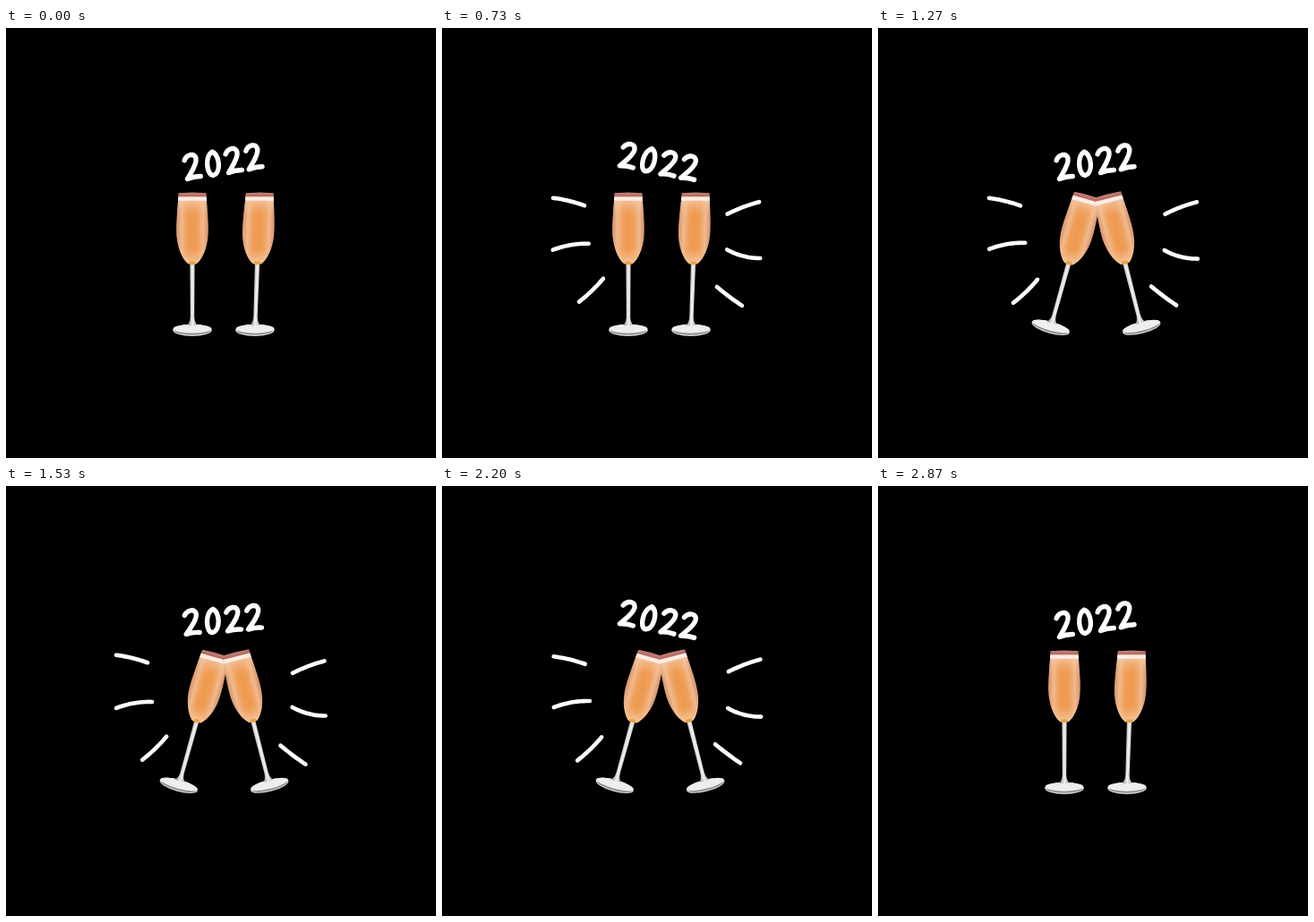
Animation, 480 px wide and 480 px high, one loop 2990 ms. Source, as an HTML page with a canvas:

```html
<!DOCTYPE html>
<html lang="en">
<head>
<meta charset="utf-8">
<title>Cheers 2022</title>
<style>
  html, body { margin: 0; width: 100%; height: 100%; overflow: hidden; background: #000; }
  canvas { display: block; width: 100vmin; height: 100vmin; }
</style>
</head>
<body>
<canvas id="stage" width="480" height="480" aria-label="Two glasses clinking, 2022"></canvas>
<script>
const ctx = document.getElementById('stage').getContext('2d');
const LOOP = 2990, TICK = 200 / 3;

const lerp = (a, b, k) => a + (b - a) * k;
const rad = d => d * Math.PI / 180;
// 0 before a, 1 after b, straight in between
const ramp = (t, a, b) => Math.max(0, Math.min(1, (t - a) / (b - a)));

// Both motions go there and back twice per loop
const tiltAt = t => ramp(t, 70, 330) - ramp(t, 600, 730) + ramp(t, 800, 1000) - ramp(t, 2330, 2530);
const swingAt = t => ramp(t, 70, 530) - ramp(t, 870, 1070) + ramp(t, 1400, 2000) - ramp(t, 2330, 2670);

function shape(fill, build) {
  ctx.beginPath();
  build();
  ctx.fillStyle = fill;
  ctx.fill();
}

const oval = (cx, cy, rx, ry) => () => ctx.ellipse(cx, cy, rx, ry, 0, 0, 7);

function gradient(x0, y0, x1, y1, colors) {
  const g = ctx.createLinearGradient(x0, y0, x1, y1);
  colors.forEach((c, i) => g.addColorStop(i / (colors.length - 1), c));
  return g;
}

function bowl() {
  ctx.moveTo(-15.2, -152);
  ctx.bezierCurveTo(-17, -130, -19, -112, -17, -99);
  ctx.bezierCurveTo(-15, -86, -9, -76, -4.5, -73);
  ctx.lineTo(4.5, -73);
  ctx.bezierCurveTo(9, -76, 15, -86, 17, -99);
  ctx.bezierCurveTo(19, -112, 17, -130, 15.2, -152);
  ctx.closePath();
}

// Glass with its origin at the middle of the foot
function glass(x, y, angle, skew) {
  ctx.save();
  ctx.translate(x, y);
  ctx.rotate(rad(angle));
  ctx.transform(1, 0, skew, 1, 0, 0);

  shape('#d6d3d1', oval(0, 1, 21.8, 6.6));
  shape('#8f8c8a', oval(0, 1.4, 20, 4.8));
  shape('#efeeed', oval(0, -0.5, 21.4, 5));

  shape(gradient(-2.5, 0, 2.5, 0, ['#bdb9b6', '#f6f4f2', '#cfcbc8']), () => {
    ctx.moveTo(-2.6, -74);
    ctx.lineTo(-2.2, -14);
    ctx.quadraticCurveTo(-2.5, -7, -6, -4);
    ctx.lineTo(6, -4);
    ctx.quadraticCurveTo(2.5, -7, 2.2, -14);
    ctx.lineTo(2.6, -74);
  });

  ctx.save();
  ctx.beginPath();
  bowl();
  ctx.clip();
  ctx.fillStyle = gradient(-18, 0, 18, 0,
    ['#d4946c', '#f2b98c', '#ef9f5a', '#ee994e', '#efa05c', '#f2b98c', '#d0906e']);
  ctx.fillRect(-20, -153, 40, 82);
  const clear = 'rgba(244,190,145,0)';
  ctx.fillStyle = gradient(0, -146, 0, -72, ['rgba(246,208,184,.75)', clear, clear, clear, 'rgba(250,215,185,.85)']);
  ctx.fillRect(-20, -148, 40, 78);
  ctx.fillStyle = '#fbece4';
  ctx.fillRect(-20, -148, 40, 4.5);
  ctx.fillStyle = '#b56f69';
  ctx.fillRect(-20, -153, 40, 5);
  ctx.restore();

  shape('#c07a73', oval(0, -151.5, 15.2, 1.3));
  shape('#e9a34f', oval(0, -74, 4, 2));
  ctx.restore();
}

function two(x, y) {
  ctx.moveTo(x - 7.5, y - 8.5);
  ctx.bezierCurveTo(x - 4, y - 15, x + 5, y - 15.5, x + 5.5, y - 9);
  ctx.bezierCurveTo(x + 6, y - 2, x - 3, y + 7, x - 7, y + 12.5);
  ctx.quadraticCurveTo(x + 1, y + 10.5, x + 8, y + 11.5);
}

function year(angle) {
  ctx.save();
  ctx.translate(242.3, 149.3);
  ctx.rotate(rad(angle));
  ctx.lineWidth = 5.4;
  ctx.beginPath();
  two(-35, 1);
  two(11.5, 0.5);
  two(34.5, 0);
  ctx.moveTo(-10.5, -12.5);
  ctx.bezierCurveTo(-20, -9, -20, 13, -13, 13.5);
  ctx.bezierCurveTo(-3, 12, -3, -9, -10.5, -12.5);
  ctx.stroke();
  ctx.restore();
}

// Inner end, outer end, sideways bend; in the order they are drawn
const RAYS = [
  [319.5, 208, 355, 194.5, -1],
  [159, 198, 124, 189.5, 1],
  [306, 289, 334, 310, 0.5],
  [319, 247.5, 356, 257, 2.5],
  [164, 240.5, 124, 247.5, 2],
  [179, 280, 152, 306, -1]
];

function ray([x0, y0, x1, y1, bow], i, t) {
  const grow = ramp(t, 60 + i * 10, 420 + i * 10);
  const wipe = ramp(t, 2330 + i * 35, 2610 + i * 35);
  if (grow <= wipe) return;
  const dx = Math.sin(t / 170 + i * 2), dy = Math.sin(t / 210 + i * 3);
  const len = Math.hypot(x1 - x0, y1 - y0);
  const nx = (y0 - y1) / len, ny = (x1 - x0) / len;
  ctx.lineWidth = 4.6;
  ctx.beginPath();
  for (let s = 0; s <= 12; s++) {
    const k = lerp(wipe, grow, s / 12), b = bow * 4 * k * (1 - k);
    ctx.lineTo(lerp(x0, x1, k) + nx * b + dx, lerp(y0, y1, k) + ny * b + dy);
  }
  ctx.stroke();
}

function draw(t) {
  ctx.fillStyle = '#000';
  ctx.fillRect(0, 0, 480, 480);
  ctx.strokeStyle = '#fff';
  ctx.lineCap = ctx.lineJoin = 'round';
  const k = tiltAt(t), y = lerp(336.3, 333.5, k);
  RAYS.forEach((r, i) => ray(r, i, t));
  glass(lerp(208, 193, k), y, 15.6 * k, 0);
  glass(lerp(278, 294, k), y, -14.4 * k, -0.034 * (1 - k));
  year(lerp(-8, 12, swingAt(t)));
}

const start = performance.now();
function frame() {
  const t = (performance.now() - start) % LOOP;
  draw(Math.floor((t + 4) / TICK) * TICK);
  requestAnimationFrame(frame);
}
frame();
</script>
</body>
</html>
```
